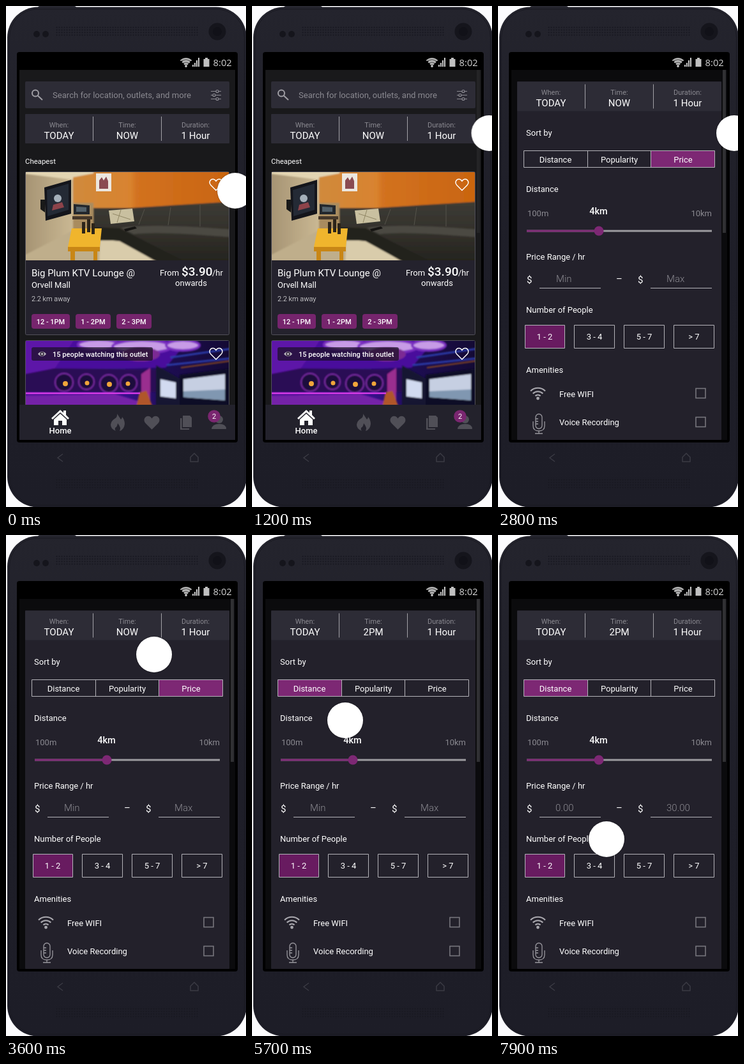
Animation, 376 px wide and 784 px high, one loop 8 s. Source, as an HTML page:

```html
<!DOCTYPE html>
<html lang="en">
<head>
<meta charset="utf-8">
<title>Karaoke booking filters</title>
<style>
html, body { margin: 0; width: 100%; height: 100%; overflow: hidden; background: #fbfbfd; }
svg { display: block; width: 376px; height: 784px; }
text { font-family: Roboto, "Open Sans", sans-serif; font-size: 13px; fill: #fff; }
.mid { text-anchor: middle; }
.big { font-size: 15px; }
.small { font-size: 11px; }
.light { font-weight: 300; }
.medium { font-weight: 500; }
.dim { fill: #8b8a91; }
.line { fill: none; stroke: #b5b4ba; }
.icon { fill: #504f57; }

#cursor, #filter, #bar, .before, .after { animation: 8s linear infinite; }
#cursor { animation-name: roam; }
#filter { animation-name: reveal; }
#bar { animation-name: bar; }
.before, .after { animation-timing-function: step-end; }
.after { opacity: 0; }
.time.before { animation-name: timeOff; } .time.after { animation-name: timeOn; }
.sort.before { animation-name: sortOff; } .sort.after { animation-name: sortOn; }
.price.before { animation-name: priceOff; } .price.after { animation-name: priceOn; }

@keyframes roam {
  0% { transform: translate(359px, 289px); }
  3% { transform: translate(350px, 292px); }
  8.75% { transform: translate(348px, 293px); animation-timing-function: ease-in; }
  11.25% { transform: translate(355px, 247px); animation-timing-function: ease-out; }
  17.5%, 30.5% { transform: translate(376px, 186px); }
  32.5%, 35% { transform: translate(370px, 199px); animation-timing-function: ease-in-out; }
  45%, 52.5% { transform: translate(232px, 187px); animation-timing-function: ease-in-out; }
  61.25% { transform: translate(160px, 306px); animation-timing-function: ease-out; }
  67.5%, 75% { transform: translate(146px, 290px); animation-timing-function: ease-in-out; }
  85% { transform: translate(168px, 467px); animation-timing-function: ease-out; }
  87.5%, 90% { transform: translate(153px, 474px); }
  91.25%, 96% { transform: translate(158px, 474px); }
  98.7%, 100% { transform: translate(170px, 476px); }
}
@keyframes reveal { 0%, 27% { opacity: 0; } 30.5%, 100% { opacity: 1; } }
@keyframes bar {
  0%, 14% { opacity: 0; } 16%, 75% { opacity: 1; }
  78%, 96% { opacity: 0; } 97.5%, 100% { opacity: 1; }
}
@keyframes timeOff { 0% { opacity: 1; } 52%, 100% { opacity: 0; } }
@keyframes timeOn { 0% { opacity: 0; } 52%, 100% { opacity: 1; } }
@keyframes sortOff { 0% { opacity: 1; } 70%, 100% { opacity: 0; } }
@keyframes sortOn { 0% { opacity: 0; } 70%, 100% { opacity: 1; } }
@keyframes priceOff { 0% { opacity: 1; } 96.25%, 100% { opacity: 0; } }
@keyframes priceOn { 0% { opacity: 0; } 96.25%, 100% { opacity: 1; } }
</style>
</head>
<body>
<svg viewBox="0 0 376 784">
  <defs>
    <linearGradient id="shell" x2="0" y2="1">
      <stop offset="0" stop-color="#24242d"/><stop offset=".5" stop-color="#1e1e28"/><stop offset="1" stop-color="#1d1d27"/>
    </linearGradient>
    <linearGradient id="wall"><stop offset="0" stop-color="#a39171"/><stop offset="1" stop-color="#cbb994"/></linearGradient>
    <linearGradient id="orange"><stop offset="0" stop-color="#d08a3c"/><stop offset=".36" stop-color="#d9832f"/><stop offset=".4" stop-color="#d27220"/><stop offset="1" stop-color="#c9640f"/></linearGradient>
    <linearGradient id="sofa" x2="0" y2="1"><stop offset="0" stop-color="#3d3b34"/><stop offset=".5" stop-color="#33312b"/><stop offset="1" stop-color="#24231e"/></linearGradient>
    <linearGradient id="neon"><stop offset="0" stop-color="#55109a"/><stop offset=".5" stop-color="#35108a"/><stop offset=".7" stop-color="#1d0d52"/><stop offset="1" stop-color="#140a34"/></linearGradient>
    <filter id="soft"><feGaussianBlur stdDeviation="1.2"/></filter>
    <pattern id="holes" x="78" y="32" width="4" height="4" patternUnits="userSpaceOnUse"><circle cx="1.5" cy="1.5" r="1.1" fill="#17171f"/></pattern>
    <clipPath id="room"><rect x="31" y="260" width="318" height="138"/></clipPath>
    <clipPath id="club"><rect x="31" y="524" width="318" height="100"/></clipPath>
    <clipPath id="view"><rect x="21" y="100" width="338" height="579"/></clipPath>
    <path id="heart" d="M0 9L-8 1C-14 -5 -5 -13 0 -5.5C5 -13 14 -5 8 1Z"/>
    <g id="wifi" fill="none" stroke-width="2.2">
      <path d="M-11.5 -4.5A16.3 16.3 0 0 1 11.5 -4.5M-7.8 -.5A11 11 0 0 1 7.8 -.5M-4 3.3A5.8 5.8 0 0 1 4 3.3"/>
      <circle cy="7" r="1.3"/>
    </g>
    <g id="when">
      <rect x="30" width="320" height="46" rx="1" fill="#2d2c36"/>
      <path d="M136.5 4V42M243.5 4V42" stroke="#a3a2a8"/>
      <text class="mid small dim" x="83" y="20.5">When:</text>
      <text class="mid small dim" x="190" y="20.5">Time:</text>
      <text class="mid small dim" x="297" y="20.5">Duration:</text>
      <text class="mid big" x="83" y="38.5">TODAY</text>
      <text class="mid big" x="297" y="38.5">1 Hour</text>
    </g>
  </defs>

  <!-- phone -->
  <rect x="50" y="0" width="60" height="8" rx="3" fill="#2a2a33"/>
  <rect x="2" y="1.5" width="375" height="783" rx="48" fill="url(#shell)"/>
  <rect x="5.5" y="5" width="368" height="776" rx="44" fill="none" stroke="#191921"/>
  <path d="M78 32H302V48H78ZM78 738H302V757H78Z" fill="url(#holes)"/>
  <g fill="#15151c"><circle cx="48" cy="44" r="5"/><circle cx="62" cy="44" r="5"/><circle cx="331" cy="40" r="13.5"/></g>
  <circle cx="331" cy="40" r="7" fill="#111118"/>
  <g fill="none" stroke="#3b3b44" stroke-width="1.5">
    <path d="M89 701L81 707L89 713"/><path d="M289 713V706L295 700L301 706V713Z"/>
  </g>
  <rect x="17" y="72" width="346" height="611" rx="4" fill="#000"/>

  <!-- status -->
  <use href="#wifi" transform="translate(282 89) scale(.75)" stroke="#c9c9c9"/>
  <path d="M275 85Q282 79.5 290 85L282 95Z" fill="#c9c9c9" opacity=".6"/>
  <path d="M292 95V92H294V95ZM295 95V89H297V95ZM298 95V85H300V95ZM301 95V81H303V95Z" fill="#c9c9c9"/>
  <path d="M309.5 83H312V81H316V83H318.5V95H309.5Z" fill="#c0c0c0"/>
  <text x="324.5" y="94" style="font-family:'Open Sans',sans-serif;font-size:14.8px;fill:#d2d2d2">8:02</text>

  <g clip-path="url(#view)">
    <!-- outlet list -->
    <g>
      <rect x="21" y="100" width="338" height="579" fill="#19191b"/>
      <rect x="30" y="118" width="320" height="42" rx="2" fill="#2d2c36"/>
      <g fill="none" stroke="#a09fa5" stroke-width="2"><circle cx="46" cy="136.5" r="5"/><path d="M50 140.5L57 147"/></g>
      <text x="73" y="144" style="font-size:13.1px" class="dim">Search for location, outlets, and more</text>
      <g stroke="#8b8a91" stroke-width="1.2" fill="#2d2c36">
        <path d="M321 133.5H337M321 139.5H337M321 145.5H337"/>
        <circle cx="331" cy="133.5" r="2"/><circle cx="326" cy="139.5" r="2"/><circle cx="331" cy="145.5" r="2"/>
      </g>
      <use href="#when" y="169"/>
      <text class="mid big" x="190" y="207.5">NOW</text>
      <text x="30" y="247" style="font-size:11.4px">Cheapest</text>

      <rect x="30.5" y="259.5" width="319" height="255" rx="2" fill="#24222d" stroke="#52515a"/>
      <g clip-path="url(#room)">
        <rect x="31" y="260" width="318" height="138" fill="#b9a683"/>
        <g filter="url(#soft)">
          <path d="M25 255H107V350L25 395Z" fill="url(#wall)"/>
          <path d="M25 255H137V270L107 272L25 262Z" fill="#e3d5b2"/>
          <path d="M105 268L137 262V255H355V320H105Z" fill="url(#orange)"/>
          <path d="M105 308H137V352H105Z" fill="#a98c5f"/>
          <path d="M25 392L107 350H150L245 402H25Z" fill="#bfae8b"/>
          <path d="M148 362H178L236 402H146Z" fill="#d9ccab"/>
          <path d="M137 316H196L355 306V402H240L178 367H137Z" fill="url(#sofa)"/>
          <path d="M137 346L178 348L285 402H240L178 368L137 364Z" fill="#24231f"/>
          <path d="M180 347Q240 340 355 350V362Q240 352 200 357Z" fill="#4c4a42"/>
        </g>
        <path d="M217 318L208 342M258 315L254 343M304 311V345" stroke="#55534a"/>
        <path d="M161 320L198 317L201 337L164 341Z" fill="#c9c0a0"/><path d="M167 325L195 334M180 319L174 339" stroke="#918765"/>
        <path d="M60 284L102 272V325L62 336Z" fill="#14151b"/><path d="M64 288L98 278V319L65 329Z" fill="#242a35"/>
        <circle cx="81" cy="301" r="6" fill="#a5b0ba"/><path d="M74 311L88 307L91 315L72 320Z" fill="#8d434a"/>
        <path d="M54 303H61V323L54 318Z" fill="#191919"/>
        <path d="M106 310L131 312V326H106Z" fill="#23272c"/><path d="M110 314L126 315V322H110Z" fill="#53616a"/>
        <path d="M104 329H135V334H104Z" fill="#45372a"/>
        <rect x="141" y="262" width="24" height="28" fill="#ece7df"/><path d="M146 286V273L150 268L153 273L157 267L160 274V286Z" fill="#8a4b51"/>
        <path d="M103 348H150L147 377H97Z" fill="#f0b52d"/><path d="M97 377H147V384H143V398H137V384H108V398H101V384H97Z" fill="#c88616"/>
        <path d="M119 338H124V356H119ZM127 334H132V354H127ZM134 340H139V357H134Z" fill="#2c2419"/>
        <path d="M185 349L202 345L205 348L187 353Z" fill="#161513"/>
      </g>
      <use href="#heart" x="329" y="279.5" fill="none" stroke="#fff" stroke-width="1.5"/>
      <text x="40" y="423" class="big">Big Plum KTV Lounge @</text>
      <text x="40" y="440.5">Orvell Mall</text>
      <text x="40" y="462" class="small light">2.2 km away</text>
      <text x="241" y="422">From</text>
      <text x="275" y="422" class="medium" style="font-size:19px">$3.90</text>
      <text x="323" y="422">/hr</text>
      <text x="290" y="438" class="mid">onwards</text>
      <g fill="#76256d">
        <rect x="40" y="482" width="60" height="23" rx="4"/><rect x="109" y="482" width="55" height="23" rx="4"/><rect x="173" y="482" width="55" height="23" rx="4"/>
      </g>
      <text x="70" y="498" class="mid small medium">12 - 1PM</text>
      <text x="136.5" y="498" class="mid small medium">1 - 2PM</text>
      <text x="200.5" y="498" class="mid small medium">2 - 3PM</text>

      <rect x="30.5" y="523.5" width="319" height="160" rx="2" fill="#24222d" stroke="#52515a"/>
      <g clip-path="url(#club)">
        <rect x="31" y="524" width="318" height="100" fill="url(#neon)"/>
        <g filter="url(#soft)">
          <path d="M25 518H110L75 572L25 580Z" fill="#5d12a8"/>
          <path d="M110 518H290L250 566L76 568Z" fill="#4a119c"/>
          <g fill="#c79be6" stroke="#7a2fc0" stroke-width="4">
            <ellipse cx="145" cy="530" rx="32" ry="8"/><ellipse cx="213" cy="533" rx="46" ry="10"/><ellipse cx="277" cy="531" rx="26" ry="8"/>
          </g>
          <ellipse cx="211" cy="545" rx="30" ry="11" fill="#7c2c94"/>
          <path d="M25 577L76 567L238 569V604H25Z" fill="#2a0b55"/>
          <g fill="#1d0f3c" stroke="#7a2aa5" stroke-width="2">
            <circle cx="91" cy="589" r="14"/><circle cx="126" cy="588" r="12"/><circle cx="161" cy="591" r="14"/><circle cx="192" cy="590" r="13"/>
          </g>
          <path d="M25 610L170 607L240 628H25Z" fill="#7420a8"/>
          <path d="M212 576L226 566V618L212 614Z" fill="#9a2f8f"/>
          <path d="M235 562L272 583V628H235Z" fill="#151433"/>
          <path d="M272 577L355 567V628H272Z" fill="#0e0c28"/>
          <path d="M258 550L355 536M252 562L355 551" stroke="#2a3aa8" stroke-width="3"/>
          <path d="M274 566L355 555" stroke="#8a4a24" stroke-width="2"/>
          <path d="M204 628L209 605L220 602L230 628Z" fill="#b0562a"/>
          <path d="M242 584L266 589V614L242 611Z" fill="#d2daf0"/>
          <path d="M278 584L343 576V617L278 612Z" fill="#c6cfe2"/><path d="M278 603L343 600V617L278 612Z" fill="#8097b1"/>
        </g>
        <path d="M31 606H210" stroke="#d63ae6" stroke-width="2.5"/>
        <g fill="#f0a53a"><circle cx="93" cy="591" r="4"/><circle cx="127" cy="590" r="3.5"/><circle cx="162" cy="592" r="4"/><circle cx="191" cy="591" r="3.5"/></g>
      </g>
      <rect x="40" y="534" width="190" height="21" rx="3" fill="#171020" opacity=".7"/>
      <path d="M50 544.5Q56.500 537 63 544.5Q56.500 552 50 544.5Z" fill="#b9b6be"/>
      <circle cx="56.5" cy="544.5" r="2.5" fill="#b9b6be" stroke="#2d2037" stroke-width="1.4"/>
      <text x="73" y="548.5" class="medium" style="font-size:11.1px">15 people watching this outlet</text>
      <use href="#heart" x="329" y="544" fill="none" stroke="#fff" stroke-width="1.5"/>

      <rect x="21" y="624" width="338" height="55" fill="#23222c"/>
      <path d="M71 645L85 632L90 636.5V633H94V640L99 645L97 647L85 636L73 647ZM75 647L85 638L95 647V656H88V649H82V656H75Z" fill="#fff"/>
      <text x="85" y="669" class="mid medium">Home</text>
      <path class="icon" d="M174 638Q178 644 180 647Q182 645 182 643Q186 648 186 654Q185 663 178 665Q181 660 175 653Q174 659 171 660Q170 663 172 665Q164 662 164 655Q165 649 170 646Q175 643 174 638Z"/>
      <use class="icon" href="#heart" transform="translate(228.5 652) scale(1.2)"/>
      <path class="icon" d="M277 641H288L291 644V659H277Z"/><path class="icon" d="M273 645H275.5V661H287V663H273Z"/>
      <circle class="icon" cx="334" cy="647" r="6"/><path class="icon" d="M322 662Q323 654 334 654Q345 654 345 662Z"/>
      <circle cx="326" cy="642" r="9.8" fill="#7a2670"/>
      <text x="326" y="646" class="mid small">2</text>
    </g>

    <!-- filters -->
    <g id="filter">
      <rect x="21" y="100" width="338" height="579" fill="#0b0b0d"/>
      <rect x="30" y="118" width="320" height="561" rx="1" fill="#23212b"/>
      <use href="#when" y="118.5"/>
      <text class="mid big time before" x="190" y="157">NOW</text>
      <text class="mid big time after" x="190" y="157">2PM</text>

      <text x="44" y="203">Sort by</text>
      <rect class="sort before" x="240" y="226" width="100" height="26" fill="#7d2874"/>
      <rect class="sort after" x="40" y="226" width="100" height="26" fill="#7d2874"/>
      <path class="line" d="M40.5 226.5H339.5V252.5H40.5ZM140.5 226V252M239.5 226V252"/>
      <text class="mid" x="90" y="244.5">Distance</text>
      <text class="mid" x="190" y="244.5">Popularity</text>
      <text class="mid" x="290" y="244.5">Price</text>

      <text x="44" y="291">Distance</text>
      <text x="46" y="329" class="dim">100m</text>
      <text x="335" y="329" class="dim" text-anchor="end">10km</text>
      <text x="157.5" y="326" class="mid medium" style="font-size:14.5px">4km</text>
      <path d="M45 352H335" stroke="#9c9b9f" stroke-width="3"/>
      <path d="M45 352H158" stroke="#7d2874" stroke-width="3"/>
      <circle cx="158" cy="352" r="7.5" fill="#7d2874"/>

      <text x="44" y="397">Price Range / hr</text>
      <text x="45" y="433" class="big">$</text>
      <text x="190" y="432" class="mid big">–</text>
      <text x="219" y="433" class="big">$</text>
      <path class="line" d="M65 441.5H161M239 441.5H335"/>
      <g class="price before"><text x="91" y="432" class="big light dim">Min</text><text x="264" y="432" class="big light dim">Max</text></g>
      <g class="price after"><text x="90" y="432" class="big light dim">0.00</text><text x="264" y="432" class="big light dim">30.00</text></g>

      <text x="44" y="480">Number of People</text>
      <rect x="42" y="500" width="62" height="35" fill="#681b60"/>
      <path class="line" d="M42.5 499.5H104.5V535.5H42.5ZM119.5 499.5H182.5V535.5H119.5ZM197.5 499.5H260.5V535.5H197.5ZM275.5 499.5H338.5V535.5H275.5Z"/>
      <text class="mid" x="73" y="522">1 - 2</text>
      <text class="mid" x="151" y="522">3 - 4</text>
      <text class="mid" x="229" y="522">5 - 7</text>
      <text class="mid" x="307" y="522">&gt; 7</text>

      <text x="44" y="574">Amenities</text>
      <use href="#wifi" x="62.5" y="607" stroke="#aaa9af"/>
      <text x="96" y="612">Free WIFI</text>
      <g fill="none" stroke="#99989e" stroke-width="1.3">
        <rect x="59" y="638.5" width="10" height="23" rx="5"/>
        <path d="M55 650V657Q55 665 64 665Q73 665 73 657V650M64 665V669M58 669H70M59 646H63M59 650H63M59 654H63"/>
      </g>
      <text x="96" y="656">Voice Recording</text>
      <g fill="none" stroke="#77767d" stroke-width="1.6"><rect x="310" y="598.5" width="15" height="15"/><rect x="310" y="643.5" width="15" height="15"/></g>
    </g>
    <rect id="bar" x="352" y="100" width="5" height="255" fill="#303033"/>
  </g>

  <g id="cursor">
    <circle r="29" opacity=".18"/>
    <circle r="28" fill="#fff"/>
  </g>
</svg>
</body>
</html>
```
